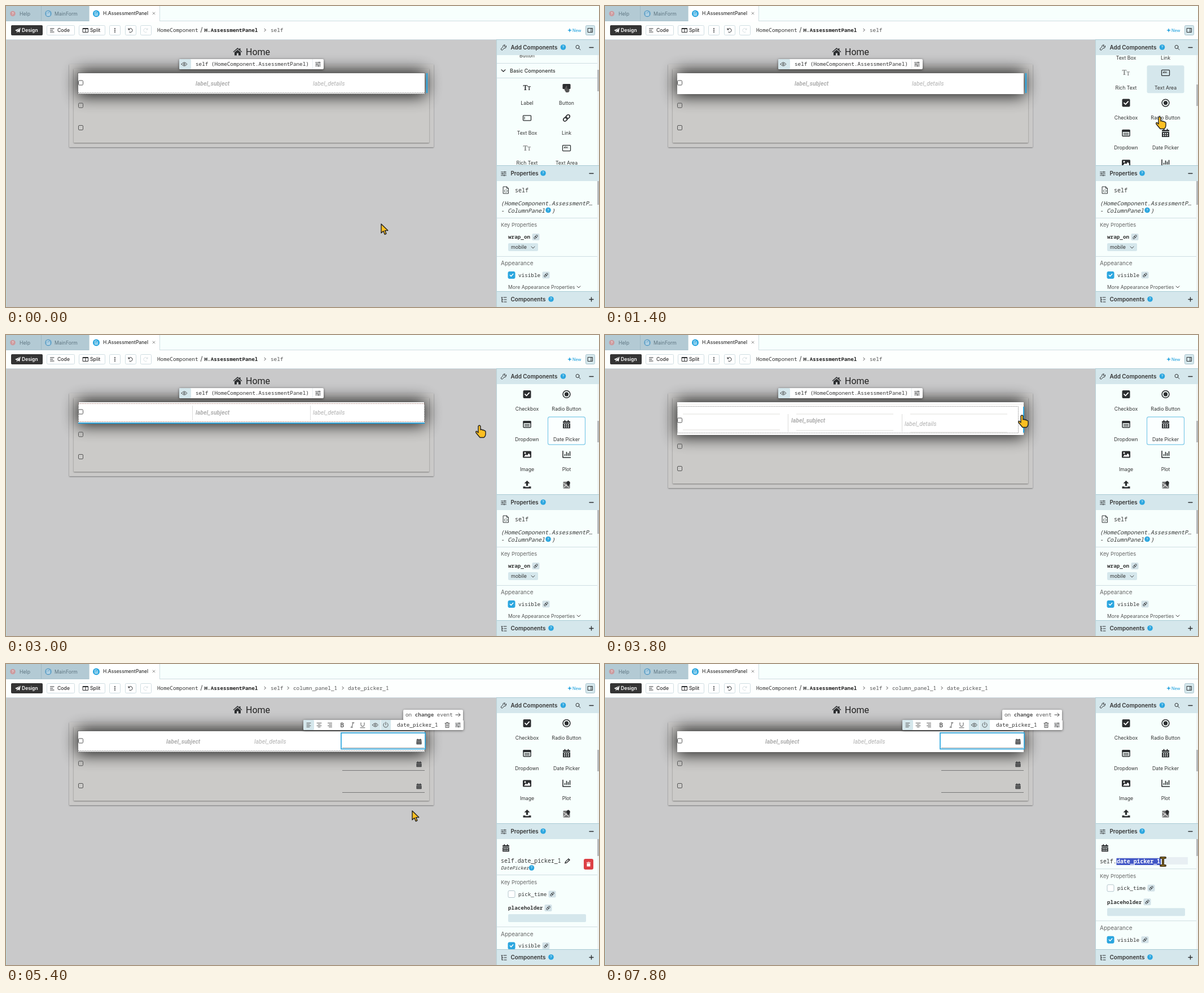
Recreate the animation shown at these times as an HTML page. Size 1051 px wide and 533 px high, loop 8 s.

```html
<!DOCTYPE html>
<html lang="en">
<head>
<meta charset="utf-8">
<title>Form designer</title>
<style>
html, body { margin: 0; height: 100%; overflow: hidden }
svg { display: block; width: 100vw; height: 100vh }
.ui { font-family: Inter, sans-serif }
.mono { font-family: "Noto Sans Mono", "DejaVu Sans Mono", monospace }
.rob { font-family: Roboto, sans-serif }
.slab { font-family: "Noto Serif", serif }
.lift { filter: drop-shadow(0 1px 2px #0008) }
.card { filter: drop-shadow(0 1px 1px #0006) }
.glow { filter: blur(14px) }
</style>
</head>
<body>
<svg id="stage" viewBox="0 0 1051 533">
  <defs>
    <clipPath id="listClip"><rect x="870" y="87" width="178" height="195"/></clipPath>
    <clipPath id="propClip"><rect x="870" y="310" width="178" height="195"/></clipPath>
    <clipPath id="formClip"><rect y="60" width="869" height="473"/></clipPath>
  </defs>
  <g id="scene"></g>
</svg>
<script>
const LOOP = 8000, STEP = 200;
const INK = '#2c2e30', BLUE = '#2ba6df', PALE = '#d5e7ec', PAPER = '#f7fffd', EDGE = '#cfdde2';
const scene = document.getElementById('scene');

// Linear interpolation through [time, ...values] keys.
function at(keys, t) {
  const i = keys.findIndex(k => k[0] > t);
  if (i === 0) return keys[0].slice(1);
  if (i < 0) return keys.at(-1).slice(1);
  const a = keys[i - 1], b = keys[i], u = (t - a[0]) / (b[0] - a[0]);
  return a.slice(1).map((v, n) => v + (b[n + 1] - v) * u);
}

const text = (x, y, s, { font = 'ui', size = 8.7, fill = '#333', weight = 400, anchor = 'start', style = 'normal' } = {}) =>
  `<text x="${x}" y="${y + size * .35}" class="${font}" font-size="${size}" fill="${fill}" font-weight="${weight}" text-anchor="${anchor}" font-style="${style}">${s}</text>`;
const mono = (x, y, s, o) => text(x, y, s, { font: 'mono', size: 9.3, ...o });
const box = (x, y, w, h, fill, r = 0, stroke = 'none', sw = 1, more = '') =>
  `<rect x="${x}" y="${y}" width="${w}" height="${h}" rx="${r}" fill="${fill}" stroke="${stroke}" stroke-width="${sw}" ${more}/>`;
const dot = (x, y, r, fill) => `<circle cx="${x}" cy="${y}" r="${r}" fill="${fill}"/>`;
const line = (x1, y1, x2, y2, c, w = 1, dash = '') =>
  `<path d="M${x1} ${y1}L${x2} ${y2}" stroke="${c}" stroke-width="${w}" stroke-dasharray="${dash}"/>`;
const stroke = (x, y, d, c = INK, w = 1.2) =>
  `<path transform="translate(${x} ${y})" d="${d}" fill="none" stroke="${c}" stroke-width="${w}" stroke-linejoin="round" stroke-linecap="round"/>`;
const solid = (x, y, d, c = INK) => `<path transform="translate(${x} ${y})" d="${d}" fill="${c}" fill-rule="evenodd"/>`;
const group = (inner, attrs) => `<g ${attrs}>${inner}</g>`;

const help = (x, y, c = BLUE) => dot(x, y, 4.8, c) + text(x, y, '?', { size: 6.8, fill: '#fff', anchor: 'middle' });
const chevron = (x, y) => stroke(x, y, 'M-3-1.5L0 1.5 3-1.5', '#444', 1);
const sliders = (x, y) => stroke(x, y, 'M-4.5-3H4.5M-4.5 0H4.5M-4.5 3H4.5M2-4V-2M-2-1V1M1 2V4', INK, .9);
const eye = (x, y) => stroke(x, y, 'M-5 0Q0-6.5 5 0Q0 6.5-5 0ZM-1.5 0A1.5 1.5 0 1 0 1.5 0A1.5 1.5 0 1 0-1.5 0', '#444', .9);
const link = (x, y, k = 1) => group(
  '<rect x="-7" y="-2.8" width="8" height="5.6" rx="2.8"/><rect x="-1" y="-2.8" width="8" height="5.6" rx="2.8"/>',
  `transform="translate(${x} ${y}) rotate(-45) scale(${k})" fill="none" stroke="${INK}" stroke-width="1.7"`);
const chip = (x, y) => box(x - 6.5, y - 6, 13, 12, '#d3e2e8', 2) + link(x, y, .55);
const calendar = (x, y, k = 1) => group(solid(0, 0,
  'M-6.5-5.5H-4V-7.5H-2V-5.5H2V-7.5H4V-5.5H6.5V-2.8H-6.5ZM-6.5-1.8H6.5V7H-6.5ZM-4.5 0V2H-2.5V0ZM-1 0V2H1V0ZM2.5 0V2H4.5V0ZM-4.5 3.5V5.3H-2.5V3.5ZM-1 3.5V5.3H1V3.5ZM2.5 3.5V5.3H4.5V3.5Z'),
  `transform="translate(${x} ${y}) scale(${k})"`);
const letters = (x, y, c) => text(x - 7, y, 'T', { font: 'slab', size: 12, weight: 700, fill: c })
  + text(x + 1, y + 1.5, 'T', { font: 'slab', size: 8.5, weight: 700, fill: c });
const tick = (x, y, on) => box(x - 6, y - 6, 12, 12, on ? BLUE : '#fff', 2, on ? BLUE : '#b4c5cc')
  + (on ? stroke(x, y, 'M-2.7 0L-.8 2 2.8-2', '#fff', 1.4) : '');

const tiles = [
  ['Label', (x, y) => letters(x, y, INK)],
  ['Button', (x, y) => box(x - 7, y - 7, 14, 9, INK, 1.5) + solid(x, y, 'M-1-3Q0-5 1-3V1L5 2V6L3 8H-1L-4 3Z', '#555')],
  ['Text Box', (x, y) => box(x - 7, y - 4.5, 14, 9, 'none', 1, INK, 1.3) + stroke(x, y, 'M-4.5-2V2', INK, 1)],
  ['Link', (x, y) => link(x, y)],
  ['Rich Text', (x, y) => letters(x, y, '#888')],
  ['Text Area', (x, y) => box(x - 7, y - 5, 14, 10, 'none', 1, INK, 1.3) + text(x - 5, y - 1, 'abc', { size: 4.6, weight: 700 })],
  ['Checkbox', (x, y) => box(x - 7, y - 7, 14, 14, INK, 2) + stroke(x, y, 'M-3.5 0L-1 2.6 3.7-2.5', '#fff', 1.8)],
  ['Radio Button', (x, y) => `<circle cx="${x}" cy="${y}" r="6.4" fill="none" stroke="${INK}" stroke-width="1.5"/>` + dot(x, y, 3.6, INK)],
  ['Dropdown', (x, y) => box(x - 6.5, y - 5.5, 13, 11, 'none', 1, INK, 1.5) + box(x - 7, y - 6, 14, 4, INK, 1) + stroke(x, y, 'M-4 .5H4M-4 3H4')],
  ['Date Picker', (x, y) => calendar(x, y)],
  ['Image', (x, y) => box(x - 7.5, y - 6, 15, 12, INK, 1.5) + dot(x - 3.5, y - 2.5, 1.5, '#fff') + solid(x, y, 'M-5.5 4L-2 0 0 2 3-2 5.5 1V4Z', '#fff')],
  ['Plot', (x, y) => stroke(x, y, 'M-6.5-6V5.5H7M-3 2V0M0 2V-4M3 2V-2M6 2V-5', INK, 1.6)],
  ['File Loader', (x, y) => solid(x, y, 'M0-7L5-2H1.7V2.5H-1.7V-2H-5ZM-7 3.5H-3V4.5H3V3.5H7V7H-7Z')],
  ['Map', (x, y) => box(x - 6, y - 5, 12, 12, '#777', 1) + stroke(x, y, 'M-5 5L4-3M-5-2L4 5', '#ddd') + solid(x, y, 'M3 3Q-1-2 0-4Q3-9 6-4Q7-2 3 3Z')],
];

const scrollKeys = [[1000, 0], [1200, 66.7], [1400, 133.3], [1600, 200]];
const growKeys = [[3400, 0], [3600, 10], [3800, 21], [4200, 23.5]];
const cursorKeys = [
  [0, 665, 386], [200, 665, 386], [600, 820, 290], [1000, 978, 203], [1400, 983, 196],
  [1800, 985, 175], [2200, 990, 160], [2600, 975, 160], [3000, 839, 160], [3800, 739, 142],
  [4600, 733, 147], [5000, 733, 147], [5400, 720, 260], [6000, 820, 300], [6800, 993, 350],
  [7200, 990, 350], [7800, 989, 350]];

function topBar(dropped) {
  const button = (x, w, label, tx) => box(x + .5, 34.5, w, 17, '#fff', 2, EDGE) + (label ? text(tx, 43, label, { weight: 500 }) : '');
  const page = (x, c) => dot(x, 13.5, 6, c) + stroke(x, 13.5, 'M-2-3H1L2.3-1.5V3H-2ZM-.8 0H1M-.8 1.5H1', '#fff', .8);
  const next = x => stroke(x, 42.5, 'M-1-2.3L1.3 0-1 2.3', '#444', 1);
  let s = box(0, 0, 1051, 60, '#fdfffe') + box(0, 0, 1051, 27, PAPER) + box(0, 0, 147, 27, '#b3cad4')
    + line(62.5, 0, 62.5, 27, '#9db9c5') + line(0, 26.5, 147, 26.5, '#a9c3ce') + line(272, 26.5, 1051, 26.5, EDGE)
    + box(147, 0, 125, 28, '#fff') + line(272.5, 0, 272.5, 27, EDGE) + line(147.5, 0, 147.5, 27, EDGE)
    + help(12, 13.5, '#cd9a9e') + text(24, 13.5, 'Help', { fill: '#5f7682' })
    + page(75, '#6fa9cb') + text(86, 13.5, 'MainForm', { fill: '#5f7682' })
    + page(160, BLUE) + text(172, 13.5, 'H.AssessmentPanel', { size: 8.4, weight: 500 })
    + stroke(262, 13, 'M-2-2L2 2M2-2L-2 2', '#888', .9)
    + box(9, 34, 56, 18, '#343434', 2) + solid(21, 43, 'M-5 0L5-4.5 3 4 0 2-2 4.5V1.5Z', '#fff')
    + stroke(21, 43, 'M-2 1.5L4-3.5', '#343434', .8) + text(28, 43, 'Design', { fill: '#fff', weight: 600, size: 8.5 })
    + button(72, 49, 'Code', 91) + stroke(82, 43, 'M-3.5-3H3M-3.5 0H1M-3.5 3H3')
    + button(129, 46, 'Split', 149) + stroke(141, 43, 'M-4.5-3.5H4.5V3.5H-4.5ZM0-3.5V3.5M-4.5-2.5H4.5', INK, 1)
    + button(183, 19) + [-3, 0, 3].map(d => dot(193, 43 + d, 1, INK)).join('')
    + button(211, 19) + stroke(220.5, 43, 'M-3.5-3.5V-1H-1M-3.3-1A3.5 3.5 0 1 1-2 3', INK, 1)
    + button(238, 19) + stroke(247.5, 43, 'M3.5-3.5V-1H1M3.3-1A3.5 3.5 0 1 0 2 3', '#d8e0e3', 1)
    + mono(268, 42.5, 'HomeComponent') + text(344.5, 42.5, '/', { size: 11 })
    + mono(351.5, 42.5, 'H.AssessmentPanel', { weight: 700, fill: '#222' }) + next(459) + mono(469, 42.5, 'self', { fill: '#555' });
  if (dropped) s += next(500) + mono(509, 42.5, 'column_panel_1', { fill: '#555' }) + next(597) + mono(606, 42.5, 'date_picker_1', { fill: '#555' });
  return s + solid(999, 43, 'M0-4L1-1 4 0 1 1 0 4-1 1-4 0-1-1Z', BLUE) + text(1004, 43, 'New', { size: 7.2, fill: BLUE, weight: 500 })
    + box(1027.5, 34.5, 16, 17, PALE, 2, '#a9c3ce') + stroke(1035.5, 43, 'M-4-3.5H4V3.5H-4ZM1.5-3.5V3.5', INK, 1) + line(0, 59.5, 1051, 59.5, EDGE);
}

function formView(t, dropped, hovered) {
  const preview = t >= 2800 && !dropped, open = t >= 3600 && !dropped;
  const grow = open ? at(growKeys, t)[0] : 0;
  const settle = Math.min(1, Math.max(0, (t - 3800) / 400)), h = 37 + grow;
  const check = y => box(128.5, y - 4, 8, 8, 'none', 1.5, '#555');
  const label = (x, y, s, weight) => text(x, y, s, { font: 'rob', size: 10.5, weight, fill: '#b0b0b0', style: 'italic' });
  let s = box(0, 60, 869, 473, '#c9c9ca')
    + solid(410.5, 81, 'M0-7L3-4.3V-6H5V-2.6L8 0 7 1 0-5-7 1-8 0ZM0-3.6L5.5 1V6.5H1.5V2.5H-1.5V6.5H-5.5V1Z')
    + text(425, 81.5, 'Home', { font: 'rob', size: 16, fill: '#222' })
    + box(112, 103, 646, 147 + grow, '#cac9c8', 1, 'none', 1, 'class="card"')
    + box(120, 111, 630, 131 + grow, '#cbcac8', 1, 'none', 1, 'class="card"')
    + box(126, 115, 618, h + 8, '#000', 4, 'none', 1, 'class="glow" opacity=".86"')
    + check(176 + grow) + check(215.5 + grow) + box(128, 119, 614, h, '#fff');
  if (open) {
    const y = 151 - 6 * settle, top = 140 - 6.5 * settle, rule = '#e0dfdb';
    s += box(128.5, 126.5 - 2 * settle, 604, 47 + 3 * settle, 'none', 0, settle ? '#d8a777' : '#a5a5a5', 1, 'stroke-dasharray="2 1"')
      + line(128, 123, 742, 123, '#f0eee9')
      + [[138, 28], [339, 29], [541, 32]].map(([x, d]) =>
        line(x, top, x + 172, top, rule) + line(x, top + d, x + 172, top + d, rule)).join('')
      + [324.5, 526.5].map(x => line(x, top, x, top + 32, '#dcdcda')).join('')
      + check(y) + label(330, y + .5, 'label_subject', 700) + label(531, y + 6, 'label_details')
      + (settle ? line(734, 134, 734, 166, BLUE, 2) : line(742, 127, 742, 173, BLUE, 2));
  } else {
    const [a, b] = dropped ? [284, 440] : [336, 544];
    s += check(136) + label(a, 137, 'label_subject', 700) + label(b, 137, 'label_details');
    if (preview) s += line(128, 121.5, 742, 121.5, '#b08f88', 1, '2 1') + line(128, 153.5, 742, 153.5, '#b08f88', 1, '2 1')
      + line(128.5, 119, 128.5, 156, '#777', 1, '2 1') + line(741.5, 119, 741.5, 156, '#777', 1, '2 1')
      + line(330.5, 125, 330.5, 151, '#ddd') + line(539.5, 125, 539.5, 151, '#ddd') + line(128, 156, 742, 156, BLUE, 2);
    else if (hovered) s += box(127.5, 118.5, 615, 37, 'none', 0, '#666', 1, 'stroke-dasharray="2 1"') + line(128, 153.5, 742, 153.5, '#999', 1, '2 1');
    if (!dropped && !preview) s += line(746, 119, 746, 154, BLUE, 2.4);
  }
  if (dropped) {
    s += box(594, 122, 149, 28.5, '#fff', 0, BLUE, 1.7) + line(596, 148.5, 741, 148.5, '#aaa')
      + [188.5, 227.5].map(y => line(596, y, 742, y, '#777')).join('')
      + [137.5, 177.5, 216.5].map(y => calendar(732, y, .68)).join('')
      + group(box(704, 81, 106, 19, '#fff', 2) + box(527, 99, 284, 18, '#fff', 2), 'class="lift"')
      + box(527, 99, 19, 18, PALE, 2) + box(645, 99, 37, 18, PALE) + line(664, 99, 664, 117, '#fff')
      + mono(708, 90, 'on <tspan font-weight="700">change</tspan> event', { fill: '#555' }) + stroke(801, 90, 'M-4 0H4M1-3L4 0 1 3', '#444', 1)
      + stroke(537, 108, 'M-4-3.5H3M-4-1H1M-4 1.3H3M-4 3.7H1', '#555', .9)
      + stroke(555, 108, 'M-4-3.5H4M-2-1H2M-4 1.3H4M-2 3.7H2', '#555', .9)
      + stroke(573.5, 108, 'M-3-3.5H4M-1-1H4M-3 1.3H4M-1 3.7H4', '#555', .9)
      + text(592.5, 108, 'B', { size: 10, weight: 500 }) + stroke(614, 108, 'M-.5-4H3M-3 4H.5M1.3-4L-1.3 4', '#444', .9)
      + stroke(632, 108, 'M-3-4V-.5Q-3 2.5 0 2.5T3-.5V-4M-4 4.8H4', '#444', .9)
      + eye(654.5, 108) + stroke(673, 108, 'M0-5V0M-2.5-3.5A4.2 4.2 0 1 0 2.5-3.5', '#444', .9)
      + mono(693, 108, 'date_picker_1')
      + stroke(782, 108, 'M-4-3H4M-1.5-4.5H1.5M-3-3V4.5H3V-3M-1-1V2.5M1-1V2.5', '#444', .9) + sliders(801, 108);
  } else s += box(307, 94, 256, 18, '#fff', 2, 'none', 1, 'class="lift"') + box(307, 94, 21, 18, PALE, 2)
    + eye(316, 103) + mono(336, 103, 'self (HomeComponent.AssessmentPanel)') + line(543.5, 94, 543.5, 112, '#e5ecef') + sliders(553, 103);
  return group(s, 'clip-path="url(#formClip)"') + line(.5, 27, .5, 533, '#bcdcde');
}

function componentList(t, dropped) {
  const scroll = at(scrollKeys, t)[0];
  const hover = t < 1000 || t >= 2400 ? '' : t < 1200 ? 'Link' : t < 1600 ? 'Text Area' : 'Date Picker';
  const held = t >= 2400 && !dropped ? 'Date Picker' : '';
  const list = text(923.5, 88, 'Button', { anchor: 'middle' }) + line(870, 101.5, 1048, 101.5, EDGE) + line(870, 127.5, 1048, 127.5, EDGE)
    + stroke(881.5, 114.5, 'M-3.5-1.7L0 1.7 3.5-1.7') + text(893, 114.5, 'Basic Components', { size: 9, weight: 500 })
    + tiles.map(([name, icon], i) => {
      const x = i % 2 ? 993.5 : 923.5, y = 145 + 53.3 * (i >> 1);
      const back = name === held ? box(960.5, y - 13, 66, 49, '#fbffff', 3, '#7cc9e8', 1.2) : name === hover ? box(960.5, y - 13, 66, 49, PALE, 3) : '';
      return back + icon(x, y) + text(x, y + 26.5, name, { anchor: 'middle' });
    }).join('');
  return group(group(list, `transform="translate(0 ${-scroll})"`), 'clip-path="url(#listClip)"')
    + box(1048, 87, 3, 195, '#eef3f3') + box(1048, 113 + scroll * .195, 3, 38, '#b5b9bb');
}

function properties(dropped, editing) {
  const rule = y => line(870, y, 1048, y, EDGE);
  const title = (y, s, size) => text(877, y, s, { size, fill: '#666' });
  let s;
  if (dropped) {
    const d = editing ? -10.7 : 0;
    s = calendar(886, 326, .9);
    if (editing) s += box(907, 342, 126, 13, '#e8eff3') + mono(877, 350, 'self.', { size: 9.9 }) + box(906.5, 344, 78.5, 12, '#4257c6')
      + mono(907, 350, 'date_picker_1', { size: 9.9, weight: 700, fill: '#fff' });
    else s += mono(877, 349, 'self.date_picker_1', { size: 9.9 }) + solid(995, 348.5, 'M-5 5L-4 1.5 2-4.5 5-1.5-1 4ZM-3 2.3L-2 3.3 2.5-1.2 1.5-2.2Z')
      + mono(877, 361, 'DatePicker', { size: 8.3, style: 'italic' }) + help(931.5, 361)
      + box(1024, 345, 17, 19, '#dc4045', 3) + solid(1032.5, 354.5, 'M-3.5-3.5H-1L-.5-4.3H.5L1-3.5H3.5V-2.5H-3.5ZM-3-1.8H3V4H-3Z', '#fff');
    s += rule(373.5 + d) + title(386.5 + d, 'Key Properties', 9.3) + tick(896, 407.5 + d) + mono(908, 407.5 + d, 'pick_time') + chip(968, 407.5 + d)
      + mono(890, 432 + d, 'placeholder', { weight: 600 }) + chip(961, 432 + d) + box(890, 443 + d, 138, 14, PALE, 2)
      + rule(465.5 + d) + title(478 + d, 'Appearance', 10)
      + tick(896, 499 + d, true) + mono(908, 499 + d, 'visible', { weight: 500 }) + chip(957, 499 + d);
  } else s = stroke(886, 326, 'M-4.5-6H1.5L4.5-3V6H-4.5ZM1.5-6V-3H4.5M-1.2-.5L-2.7 1.5-1.2 3.5M1.2-.5L2.7 1.5 1.2 3.5', INK, 1)
    + mono(902, 326, 'self', { size: 10 }) + mono(877, 349, '(HomeComponent.AssessmentP…', { size: 10, style: 'italic' })
    + mono(877, 362, '- ColumnPanel', { size: 10, style: 'italic' }) + help(961, 361.5) + mono(967, 362, ')', { size: 10, style: 'italic' })
    + rule(375.5) + title(388, 'Key Properties', 9.3) + mono(890, 409, 'wrap_on', { weight: 600 }) + chip(939, 409)
    + box(890, 420, 53, 14, PALE, 2) + text(895, 427, 'mobile', { size: 8.9 }) + chevron(934, 427.5) + rule(443.5)
    + title(455, 'Appearance', 10) + tick(896, 476.5, true) + mono(908, 476.5, 'visible', { weight: 500 }) + chip(957, 476.5)
    + text(890, 497.5, 'More Appearance Properties', { fill: '#555' }) + chevron(1015, 497.5);
  return group(s, 'clip-path="url(#propClip)"') + box(1048, 310, 3, 196, '#eef3f3') + box(1048, 310, 3, dropped ? 30 : 42, '#b5b9bb');
}

function sidebar(t, dropped, editing) {
  const head = (y, s, size, hx) => box(869, y, 182, 27, PALE) + line(869, y - .5, 1051, y - .5, '#a9cbd5')
    + text(894.5, y + 13.5, s, { size, weight: 600 }) + help(hx, y + 13) + stroke(1037.5, y + 13.5, 'M-3.5 0H3.5', INK, 1.4);
  return box(869, 60, 182, 473, PAPER) + componentList(t, dropped) + properties(dropped, editing)
    + head(60, 'Add Components', 9.9, 987.5) + head(283, 'Properties', 9.8, 952) + head(506, 'Components', 10, 966)
    + stroke(882, 73.5, 'M4.5-2.5L2.5-1 1-2.5 2.5-4.5Q-1.5-5-1.3-1L-4.7 2.4Q-5 4.5-2.5 4.7L1 1.3Q5 1.5 4.5-2.5Z', INK, 1)
    + stroke(1014, 73, 'M2-.5A3 3 0 1 1-4-.5A3 3 0 1 1 2-.5M1.2 1.8L4 4.5', INK, 1)
    + sliders(882, 297) + stroke(882, 520, 'M-4-4H-2M0-4H5M-3-4V4H-1M-3 0H-1M1 0H5M1 4H5', INK, 1.1)
    + stroke(1037.5, 519.5, 'M0-3.5V3.5', INK, 1.4) + line(869.5, 60, 869.5, 533, '#b9d3db');
}

function cursor(t, x, y) {
  const put = d => `<path transform="translate(${x} ${y})" d="${d}" fill="#fcbf22" stroke="#222" stroke-width="1.4" stroke-linejoin="round"/>`;
  if (t >= 7200) return stroke(x, y, 'M-4-7H4M0-7V7M-4 7H4', '#352b18', 4) + stroke(x, y, 'M-4-7H4M0-7V7M-4 7H4', '#b98d25', 1);
  const hand = t >= 800 && t < 5200 || t >= 6800;
  return put(hand
    ? 'M-2 1.5Q0-1.5 2 1.5V8Q4 6.5 5.5 8.5Q7.5 7.5 8.5 9.5Q11 9 11 11.5V16Q10.5 20 8 21.5H1Q-2 18-6 13Q-7 10-4.5 10.5L-2 13Z'
    : 'M0 0V16L3.8 12.6 6.3 18.5 9 17.2 6.5 11.6H11.8Z');
}

let shown = -1;
function frame(now) {
  const t = Math.floor(now % LOOP / STEP) * STEP;
  if (t !== shown) {
    shown = t;
    const [x, y] = at(cursorKeys, t), dropped = t >= 5000;
    scene.innerHTML = formView(t, dropped, x < 869) + topBar(dropped) + sidebar(t, dropped, t >= 7200) + cursor(t, x, y);
  }
  requestAnimationFrame(frame);
}
frame(performance.now());
</script>
</body>
</html>
```
